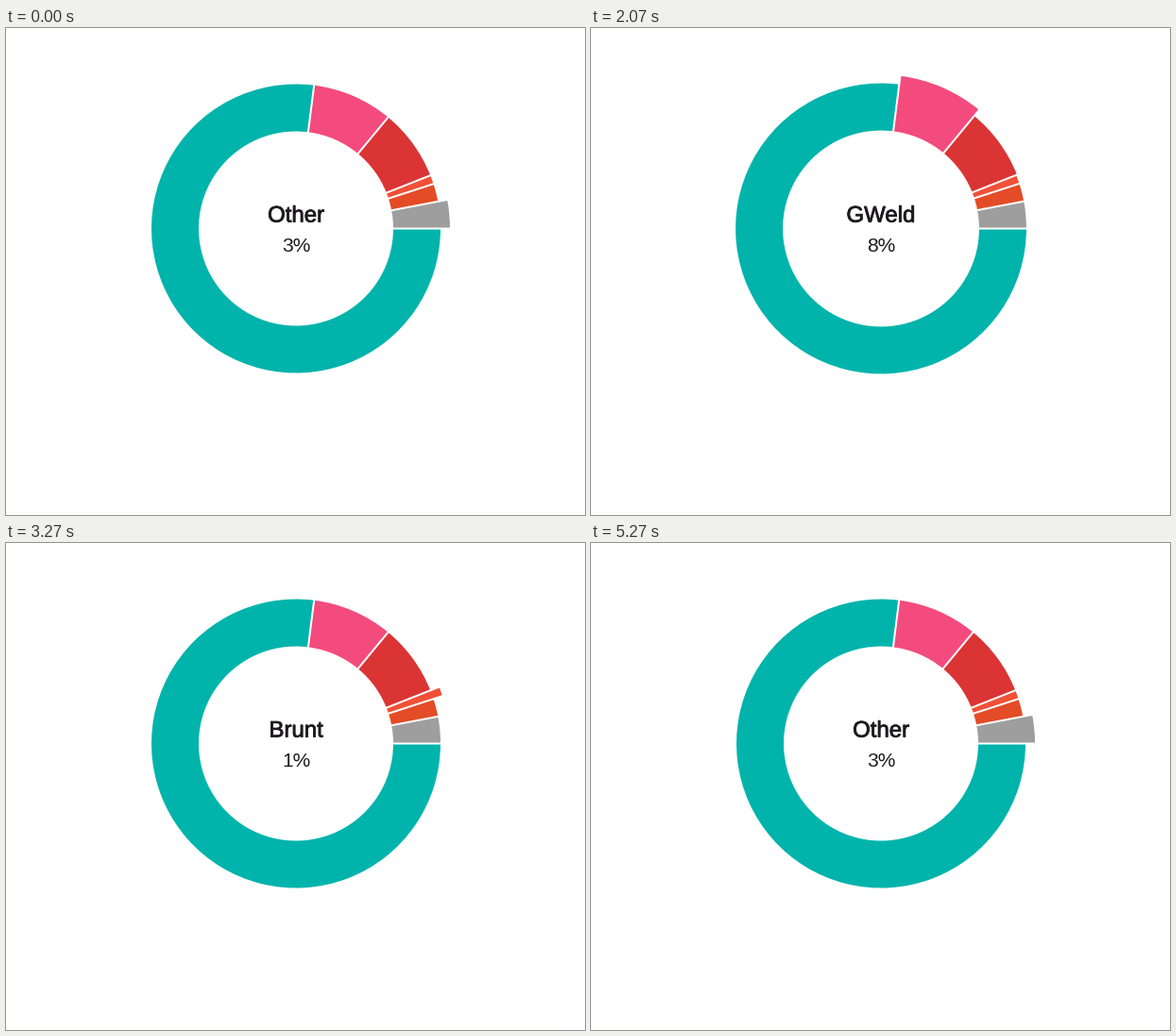
Recreate the animation shown at these times as a matplotlib script. Size 613 by 516 pixels, loop 5.99 s.

```python
import matplotlib.pyplot as plt
from matplotlib.animation import FuncAnimation
from matplotlib.patches import Wedge
from matplotlib.patheffects import Normal, Stroke

W, H, DPI = 613, 516, 64
LOOP, STEP = 5990, 10
CX, CY = 307, 212.5
REACH = 163            # outer radius of the longest slice
THICK, GROW = 50, 10   # slice depth and extra depth when selected
INK = "#1d1b20"

SLICES = [
    ("Rulk", 77, "#00b4ab"),
    ("C++", 9, "#f34b7d"),
    ("GWeld", 8, "#da3434"),
    ("Brunt", 1, "#f05138"),
    ("HTML", 2, "#e34c26"),
    ("Other", 3, "#9e9e9e"),
]
N = len(SLICES)


def px(size):
    return size * 72 / DPI


fig = plt.figure(figsize=(W / DPI, H / DPI), dpi=DPI, facecolor="white")
ax = fig.add_axes([0, 0, 1, 1])
ax.set_xlim(0, W)
ax.set_ylim(H, 0)
ax.axis("off")

# The y axis points down, so angles run clockwise.
wedges, gaps = [], []
angle = 0
for _, share, color in SLICES:
    end = angle + share * 3.6
    wedge = Wedge((CX, CY), REACH, angle, end, width=THICK, fc=color, lw=0, zorder=1)
    wedges.append(ax.add_patch(wedge))
    gaps.append(angle)
    angle = end

for a in gaps:
    spoke = Wedge((CX, CY), REACH + 6, a, a, width=80, fc="none", ec="white",
                  lw=px(2), zorder=2)
    ax.add_patch(spoke)

font = dict(family="Liberation Sans", color=INK, ha="center", va="baseline", zorder=3)
title = ax.text(CX, 205.5, "", fontsize=px(24), **font)
title.set_path_effects([Stroke(linewidth=px(0.8), foreground=INK), Normal()])
percent = ax.text(CX, 237, "", fontsize=px(21), **font)


def progress(ms):
    """Linear 150 ms tween, shown in steps of 60 to 70 ms."""
    shown = max(s for s in (0, 60, 130, 200) if s <= ms)
    return min(1, (shown + 14) / 150)


def draw(i):
    ms = i * STEP - 70
    if ms < 0:
        current, t = N - 1, 1
    else:
        current, t = ms // 1000, progress(ms % 1000)

    depth = [THICK] * N
    depth[current - 1] += GROW * (1 - t)
    depth[current] += GROW * t
    hole = REACH - max(depth)
    for wedge, d in zip(wedges, depth):
        wedge.set_radius(hole + d)
        wedge.set_width(d)

    name, share, _ = SLICES[current]
    title.set_text(name)
    percent.set_text(f"{share}%")
    return [*wedges, title, percent]


anim = FuncAnimation(fig, draw, frames=LOOP // STEP, interval=STEP,
                     init_func=lambda: draw(0), repeat=True, repeat_delay=0)
plt.show()
```
